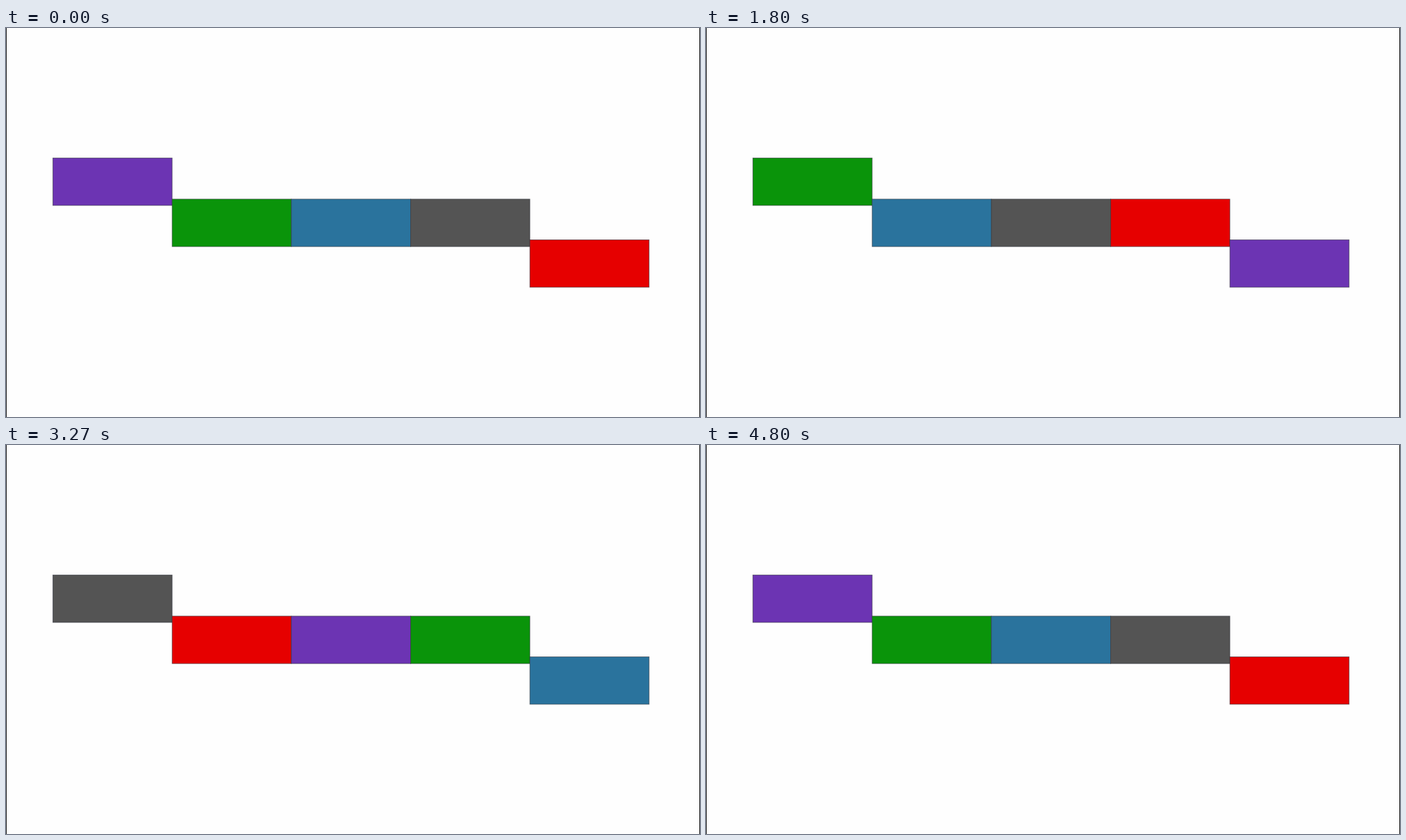
An HTML page that plays this animation: 999x561 px, repeating every 4.94 s.

```html
<!DOCTYPE html>
<html lang="en">
<head>
<meta charset="utf-8">
<title>Rotating blocks</title>
<style>
  html, body { margin: 0; width: 100%; height: 100%; overflow: hidden; background: #fefefe; }
  svg { display: block; width: 100%; height: 100%; }
</style>
</head>
<body>
<svg id="stage" viewBox="0 0 999 561">
  <rect width="999" height="561" fill="#fefefe"/>
  <path d="M.5 0V561M998.5 0V561" stroke="#202020"/>
</svg>
<script>
const LOOP = 4940;
const STEPS = [400, 870, 1330, 1800, 2270, 2800, 3270, 3730, 4200, 4670];
const COLORS = ['#6c34b3', '#0a940a', '#2a739d', '#545454', '#e60000'];
const TOPS = [187.5, 246.8, 246.8, 246.8, 305.5];
const LEFT = 67.5, WIDTH = 171.65, HEIGHT = 68.4;

const stage = document.getElementById('stage');

function addBlock(top, slot) {
  const rect = document.createElementNS('http://www.w3.org/2000/svg', 'rect');
  const attrs = {
    x: LEFT + slot * WIDTH, y: top, width: WIDTH, height: HEIGHT,
    stroke: '#30343c', 'stroke-width': 0.9, 'stroke-opacity': 0.65
  };
  for (const key in attrs) rect.setAttribute(key, attrs[key]);
  return stage.appendChild(rect);
}

const blocks = TOPS.map(addBlock);

// Each step moves every colour one slot to the right, wrapping around.
function draw(time) {
  const shift = STEPS.filter(step => time >= step).length;
  const count = COLORS.length;
  blocks.forEach((block, slot) => {
    block.setAttribute('fill', COLORS[(slot - shift + 2 * count) % count]);
  });
}

const start = performance.now();
function tick() {
  draw((performance.now() - start) % LOOP);
  requestAnimationFrame(tick);
}
tick();
</script>
</body>
</html>
```
